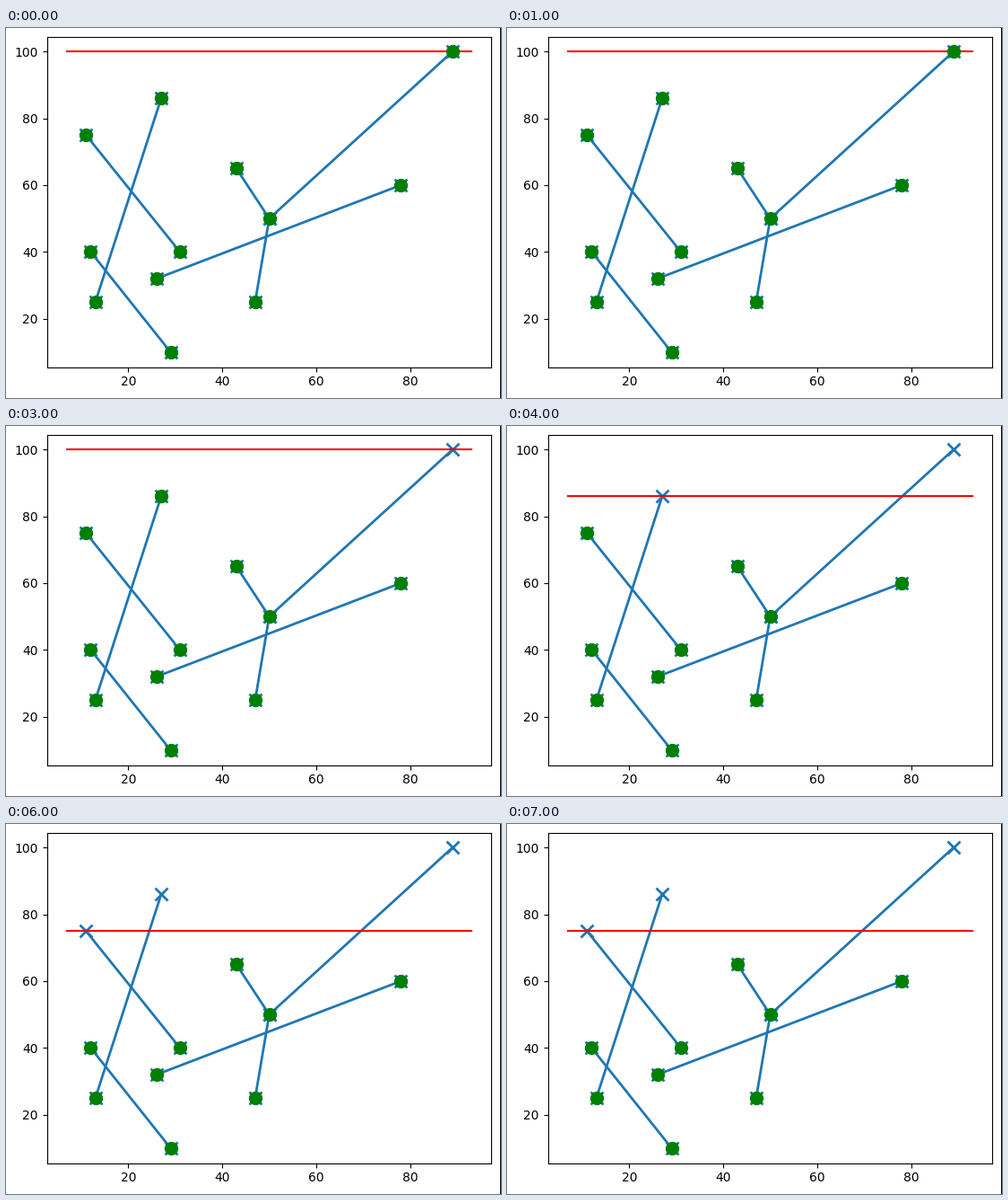
Recreate the animation shown at these times as a matplotlib script. Size 552 by 412 pixels, loop 8 s.

```python
import matplotlib.pyplot as plt
from matplotlib.animation import FuncAnimation

W, H, DPI = 552, 412, 100
STEP_MS = 1000
STEPS = 8
STEPS_PER_EVENT = 2
OVERHANG = 4

HUB = (50, 50)
PATHS = [
    [(11, 75), (31, 40)],
    [(12, 40), (29, 10)],
    [(27, 86), (13, 25)],
    [(43, 65), HUB, (89, 100)],
    [HUB, (47, 25)],
    [(26, 32), (78, 60)],
]
# Event queue of the sweep, from top to bottom
events = sorted({p for path in PATHS for p in path}, key=lambda p: -p[1])
xs = [x for x, _ in events]

fig = plt.figure(figsize=(W / DPI, H / DPI), dpi=DPI, facecolor="white")
ax = fig.add_axes([45.7 / W, 34.4 / H, 495.7 / W, 368.06 / H])
ax.tick_params(labelsize=10, labelfontfamily="DejaVu Sans")

for path in PATHS:
    ax.plot(*zip(*path), color="tab:blue", lw=2, marker="x", ms=10, mew=2, zorder=2)

top = events[0][1]
sweep, = ax.plot([min(xs) - OVERHANG, max(xs) + OVERHANG], [top, top],
                 color="red", lw=1.5, zorder=3)
queue, = ax.plot(*zip(*events), "o", color="green", ms=10, zorder=4)

# Dark window edge on the right
fig.add_artist(plt.Rectangle(((W - 1) / W, 0), 1 / W, 1, transform=fig.transFigure,
                             facecolor="black", linewidth=0))


def update(step):
    done = step // STEPS_PER_EVENT
    y = events[max(done - 1, 0)][1]
    sweep.set_ydata([y, y])
    queue.set_data(*zip(*events[done:]))
    return sweep, queue


anim = FuncAnimation(fig, update, frames=STEPS, interval=STEP_MS,
                     repeat=True, repeat_delay=0)
plt.show()
```
